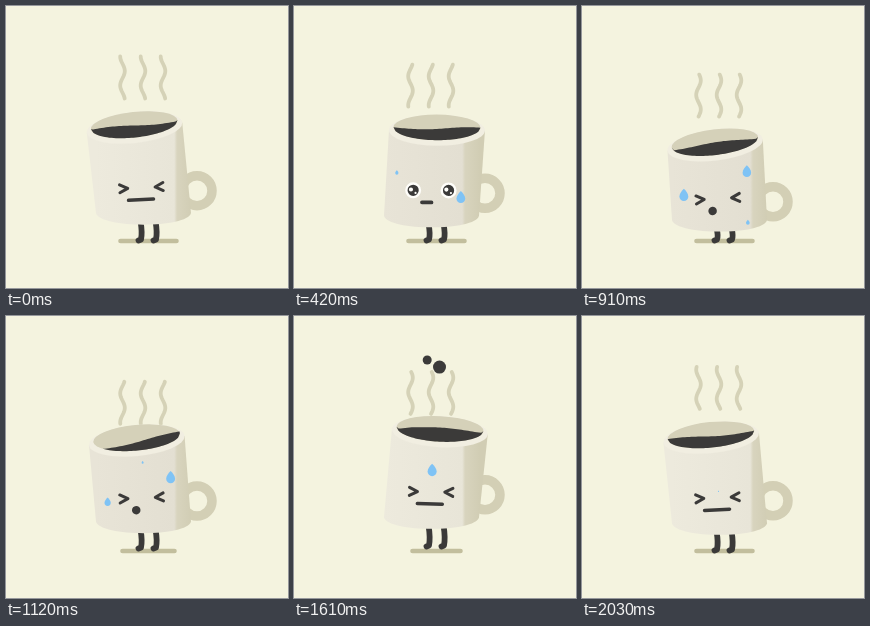
These frames come from a looping animation (282x282 px, 2.1 s). An HTML page with a canvas:

```html
<!DOCTYPE html>
<html lang="en">
<head>
<meta charset="utf-8">
<title>Jumping coffee mug</title>
<style>
html, body { margin: 0; height: 100%; overflow: hidden; background: #f4f3df; }
canvas { display: block; width: 282px; height: 282px; }
</style>
</head>
<body>
<canvas width="282" height="282"></canvas>
<script>
const ctx = document.querySelector('canvas').getContext('2d');
const STEP = 70, STEPS = 30, TAU = Math.PI * 2;
const PAPER = '#f4f3df', INK = '#3b3a39', WALL = '#d5d1b9', RIM = '#f1eee1';
const HANDLE = '#d3cfb5', GROUND = '#c2be9d', STEAM = '#d5d2b7';
const SWEAT = '#7fc3f5', WHITE = '#fffefa';

// sweat beads: birth step, x and start y relative to the face
const BEADS = [[0.5, 30, -3], [5, -34, -19], [8, 29, -36], [15.5, 1, -36]];
const BEAD_LIFE = 13.7;

const clamp = (v, a, b) => Math.min(b, Math.max(a, v));

// smooth hill of height 1 around a step
function bump(f, centre, width) {
  const d = (f - centre) / width;
  return Math.abs(d) < 1 ? Math.cos(d * Math.PI / 2) ** 2 : 0;
}

function poseAt(f) {
  const sway = Math.cos(TAU * f / 15);
  const crouch = bump(f, 13, 5.5), hop = bump(f, 20, 6);
  const by = 220.5 - 1.5 * sway + 6.5 * crouch - 17.5 * hop;
  const height = 97.5 - 10.5 * crouch;
  const cx = 136.5 - 8 * sway + 2 * crouch + 3 * hop, bx = 137.5;
  return {
    cx, cy: by - height, bx, by,
    tilt: (-2.5 - 3.5 * sway - 2 * crouch + 4 * hop) * Math.PI / 180,
    steam: 54 - 4.5 * sway + 19 * bump(f, 14.5, 6.5) - 7 * hop,
    jump: 8 * hop,
    mouth: 25 * (1 - Math.min(1, 1.6 * bump(f, 12.3, 11))),
    faceX: bx + (cx - bx) * 0.1 - 1.2,
    faceY: by - height * 0.383
  };
}

// coffee height over the mug's width, x from -1 to 1
function coffee(x, f) {
  const tip = 5 * (bump(f, 16, 4) + bump(f, 26, 3));
  const ripple = 1.2 * Math.sin(3 * x - TAU * f / 10);
  const surge = 34 * bump(f, 20, 3.5) * Math.min(3 * (x + 1), 0.62 * (1 - x));
  return -2 + tip * (0.6 - x) + ripple - surge;
}

function line(color, width, points) {
  ctx.strokeStyle = color;
  ctx.lineWidth = width;
  ctx.beginPath();
  points.forEach(p => ctx.lineTo(...p));
  ctx.stroke();
}

function disc(color, x, y, rx, ry = rx) {
  ctx.fillStyle = color;
  ctx.beginPath();
  ctx.ellipse(x, y, rx, ry, 0, 0, TAU);
  ctx.fill();
}

function drawSteam(top, f) {
  for (const x of [116.5, 137, 157]) {
    const points = [];
    for (let d = 0; d <= 42; d += 1.5)
      points.push([x - 2.3 * Math.cos(TAU * (d / 29 + f / 10)), top + 1 + d]);
    line(STEAM, 3.8, points);
  }
}

function drawLegs({ by, jump }) {
  const foot = 234.5 - jump;
  line(GROUND, 4.6, [[114.5 + jump, 235], [170.5 - jump, 235]]);
  ctx.strokeStyle = INK;
  ctx.lineWidth = 5.8;
  for (const x of [135, 150]) {
    ctx.beginPath();
    ctx.moveTo(x - 0.5, by - 4);
    ctx.quadraticCurveTo(x + 1.5, (by + foot) / 2, x, foot - 1);
    ctx.lineTo(x - 2.5, foot);
    ctx.stroke();
  }
}

function drawBody({ cx, cy, tilt, bx, by, mouth }) {
  const light = clamp((mouth - 10) / 15, 0, 1);
  const dx = 48 * Math.cos(tilt), dy = 48 * Math.sin(tilt);
  const shade = ctx.createLinearGradient(bx - 48, 0, bx + 48, 0);
  const tone = v => `rgb(${v + 5 * light},${v - 4 + 6 * light},${v - 17 + 6 * light})`;
  shade.addColorStop(0, tone(232));
  shade.addColorStop(0.82, tone(227));
  shade.addColorStop(0.85, '#d8d4be');
  shade.addColorStop(1, '#d1cdb4');
  ctx.fillStyle = shade;
  ctx.beginPath();
  ctx.moveTo(cx - dx, cy - dy);
  ctx.lineTo(bx - 47.5, by - 12);
  ctx.bezierCurveTo(bx - 44, by + 3.5, bx + 44, by + 3.5, bx + 47.5, by - 12);
  ctx.lineTo(cx + dx, cy + dy);
  ctx.fill();
}

function drawRim({ cx, cy, tilt }, f) {
  ctx.save();
  ctx.translate(cx, cy);
  ctx.rotate(tilt);
  disc(RIM, 0, 0, 48, 15.5);
  disc(WALL, 0, -2.8, 43.5, 12.8);
  const surface = [], front = [];
  for (let i = -20; i <= 20; i++) {
    const x = i / 20, edge = -2.8 + 12.8 * Math.sqrt(1 - x * x);
    surface.push([x * 43.5, Math.min(coffee(x, f), edge)]);
    front.unshift([x * 43.5, edge]);
  }
  ctx.fillStyle = INK;
  ctx.beginPath();
  surface.concat(front).forEach(p => ctx.lineTo(...p));
  ctx.fill();
  ctx.restore();
}

function drawFace(f, mouth) {
  const open = f >= 3 && f <= 10;
  for (const side of [-1, 1]) {
    const x = side * 17.7;
    if (open) {
      disc(WHITE, x, 0, 8);
      disc(INK, x, 0, 5.6);
      disc(WHITE, x - 2.2, -0.8, 2.1);
      disc(WHITE, x + 2.4, 2.6, 1.1);
    } else {
      line(INK, 3, [[x + side * 4, -4], [x - side * 4, 0], [x + side * 4, 4]]);
    }
  }
  const mx = -6 + mouth * 0.2;
  line(INK, Math.max(3.5, 8.5 - mouth * 0.5),
    [[mx - mouth / 2, 12], [mx + mouth / 2 + 0.01, 12]]);
}

function drawBeads(f) {
  ctx.fillStyle = SWEAT;
  for (const [birth, x, y] of BEADS) {
    const u = (f - birth) / BEAD_LIFE;
    if (u <= 0 || u >= 1) continue;
    const r = 4.8 * Math.sin(Math.PI * u) ** 0.7;
    ctx.save();
    ctx.translate(x, y + 30 * u ** 1.2);
    ctx.scale(r, r);
    ctx.beginPath();
    ctx.moveTo(0, -1.4);
    ctx.bezierCurveTo(0.4, -1, 0.95, -0.4, 0.95, 0.25);
    ctx.arc(0, 0.25, 0.95, 0, Math.PI);
    ctx.bezierCurveTo(-0.95, -0.4, -0.4, -1, 0, -1.4);
    ctx.fill();
    ctx.restore();
  }
}

// two drops thrown up by the surge fall back into the mug
function drawSplash(f) {
  if (f < 21 || f > 26) return;
  const fall = t => 4.33 * t * t;
  disc(INK, 144 + 3.6 * (f - 26), 44 + fall(f - 23), 4.5);
  disc(INK, 160.5 + 5 * (f - 26), 50 + fall(f - 22.5), 6.5);
}

function draw(f) {
  const pose = poseAt(f);
  ctx.fillStyle = PAPER;
  ctx.fillRect(0, 0, 282, 282);
  ctx.lineCap = ctx.lineJoin = 'round';
  drawSteam(pose.steam, f);
  drawLegs(pose);

  ctx.strokeStyle = HANDLE;
  ctx.lineWidth = 9.5;
  ctx.beginPath();
  ctx.arc(pose.bx + 53.5, pose.faceY + 3, 15, 0, TAU);
  ctx.stroke();

  drawBody(pose);
  drawRim(pose, f);

  ctx.save();
  ctx.translate(pose.faceX, pose.faceY);
  ctx.save();
  ctx.rotate(pose.tilt * 0.5);
  drawFace(f, pose.mouth);
  ctx.restore();
  drawBeads(f);
  ctx.restore();
  drawSplash(f);
}

const start = performance.now();
function tick() {
  draw(Math.floor((performance.now() - start) / STEP) % STEPS);
  requestAnimationFrame(tick);
}
tick();
</script>
</body>
</html>
```
